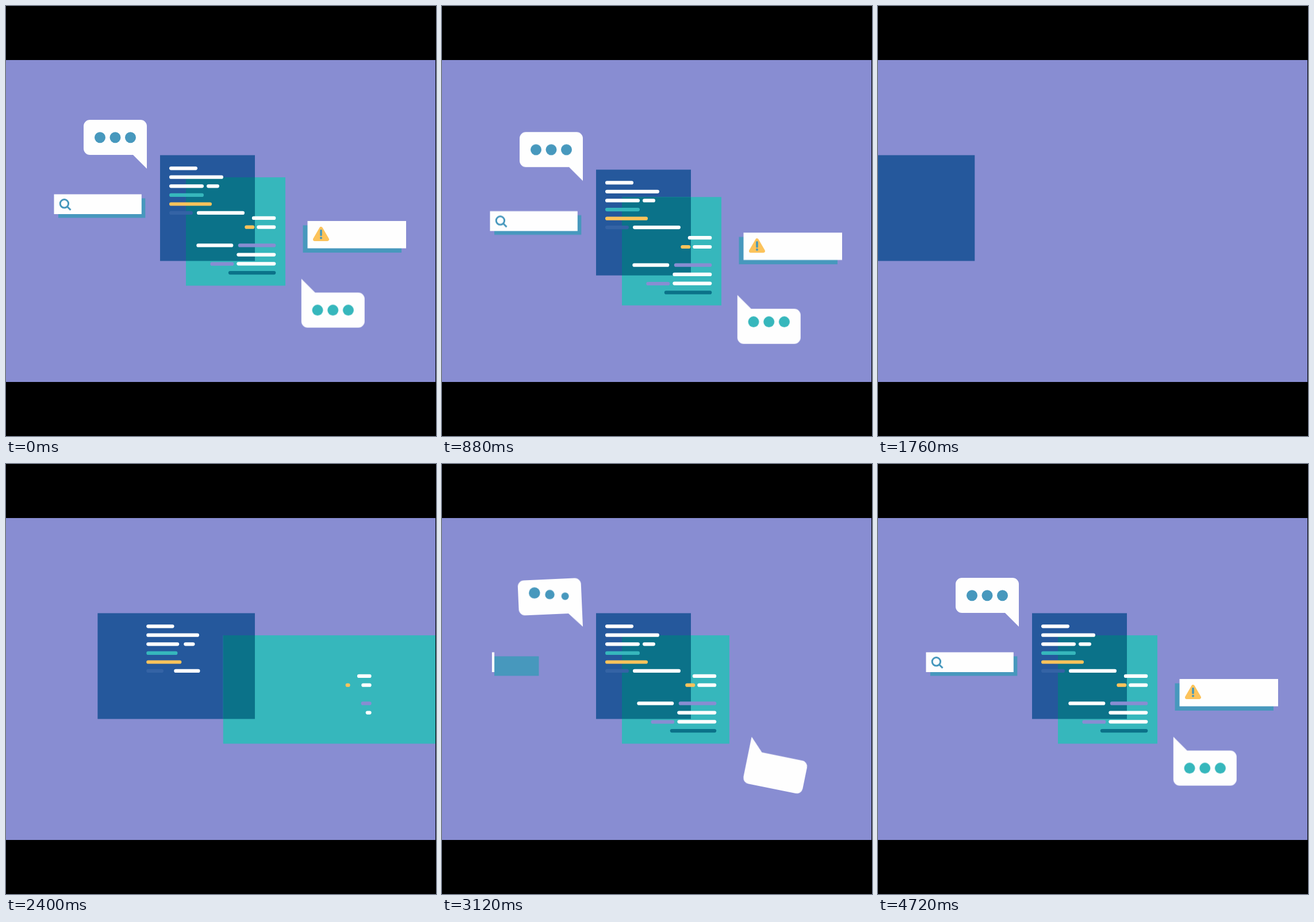
An HTML page without scripts that plays this animation: 748 by 748 pixels, repeating every 4800 ms.

```html
<!DOCTYPE html>
<html lang="en">
<head>
<meta charset="utf-8">
<title>Code sheets</title>
<style>
/* Clock in ms: starts on the empty stage (1600) and ends after everything has dropped out (6400). */
@property --t { syntax: "<number>"; inherits: true; initial-value: 4800; }
@keyframes clock { from { --t: 1600; } to { --t: 6400; } }

html, body { margin: 0; width: 100%; height: 100%; overflow: hidden; background: #000; }
svg { display: block; }

.stage {
  width: 100vw; height: 100vh;
  animation: clock 4.8s linear -3.2s infinite;
  --white: #fefefe; --lilac: #888dd2; --navy: #25589c; --teal: #36b7bc;
  --deep: #0b7289; --blue: #4798bd; --amber: #fcc35b; --dim: #3463a5;
}

/* --q runs from 1 to 0 over --d ms from --s; --e is its cubic ease-out. */
.stage * {
  --q: calc(1 - clamp(0, (var(--t) - var(--s, 0)) / var(--d, 800), 1));
  --r: calc(var(--q) * var(--q) * var(--q));
  --e: calc(1 - var(--r));
}

/* Sheet edges: the leading edge arrives first, the trailing edge catches up. */
.sheets {
  --a: clamp(0, (2440 - var(--t)) / 800, 1);
  --b: clamp(0, (2825 - var(--t)) / 800, 1);
  --c: clamp(0, (3076 - var(--t)) / 1100, 1);
  --k: clamp(0, (3461 - var(--t)) / 1100, 1);
  --navy-right: calc(433 - 433 * var(--a) * var(--a) * var(--a));
  --teal-left: calc(313 + 435 * var(--b) * var(--b) * var(--b));
  --navy-left: calc(268 - 470 * var(--c) * var(--c) * var(--c));
  --teal-right: calc(486 + 470 * var(--k) * var(--k) * var(--k));
  --n: max(0, var(--t) - 5496);
  --m: max(0, var(--t) - 5465);
}
.navy {
  x: calc(var(--navy-left) * 1px); y: 259.5px; height: 184px; fill: var(--navy);
  width: calc((var(--navy-right) - var(--navy-left)) * 1px);
}
.teal {
  x: calc(var(--teal-left) * 1px); y: 298px; height: 188.5px; fill: var(--teal);
  width: calc((var(--teal-right) - var(--teal-left)) * 1px);
}
.overlap {
  x: calc(var(--teal-left) * 1px); y: 298px; fill: var(--deep);
  width: max(0px, (var(--navy-right) - var(--teal-left)) * 1px);
  height: max(0px, (145.5 + .000735 * (var(--n) * var(--n) - var(--m) * var(--m))) * 1px);
}

.fall {
  --h: max(0, var(--t) - var(--o));
  transform: translateY(calc(var(--h) * var(--h) * .000735px));
}
.slide { transform: translateX(calc(var(--r) * var(--from) * 1px)); }
.line, .bar { width: calc(var(--w) * var(--e) * 1px); }
.line { --d: 800; height: 6.2px; rx: 3.1px; fill: var(--white); }
.bar { fill: var(--white); }
.shade { fill: var(--blue); }

.sway, .dot, .pop {
  opacity: clamp(0, var(--t) - var(--s), 1);
  animation: 4.8s ease-in-out calc((var(--s) - 4800) * 1ms) infinite;
}
.sway { animation-name: sway; }
.dot { animation-name: dot; }
.pop { animation-name: pop; }
.dot, .pop { transform-box: fill-box; transform-origin: center; }

@keyframes sway {
  0% { transform: translateX(-60px) rotate(0deg) scale(0); animation-timing-function: ease-out; }
  3.333% { transform: translateX(-25px) rotate(11.5deg) scale(.955); animation-timing-function: ease-out; }
  6.667% { transform: translateX(-8px) rotate(16deg) scale(1); }
  13.333% { transform: translateX(0) rotate(-2.5deg) scale(1); }
  15.4%, 100% { transform: translateX(0) rotate(0deg) scale(1); }
}
@keyframes dot {
  0% { transform: translateY(0) scale(0); animation-timing-function: linear; }
  1.25% { transform: translateY(0) scale(.68); animation-timing-function: linear; }
  2.9% { transform: translateY(-8px) scale(1.03); animation-timing-function: ease-out; }
  4.2% { transform: translateY(-9.5px) scale(1); }
  8.75% { transform: translateY(0) scale(1); }
  11.7% { transform: translateY(2.5px) scale(1); }
  14.6%, 100% { transform: translateY(0) scale(1); }
}
@keyframes pop {
  0% { transform: rotate(-40deg) scale(0); animation-timing-function: ease-out; }
  4% { transform: rotate(0deg) scale(1.08); }
  5.8% { transform: rotate(10deg) scale(.96); }
  9%, 100% { transform: rotate(0deg) scale(1); }
}
</style>
</head>
<body>
<svg class="stage" viewBox="0 0 748 748">
  <defs>
    <path id="bubble" fill="#fefefe" d="M0 0V-74a11 11 0 0 0-11-11H-99a11 11 0 0 0-11 11V-35a11 11 0 0 0 11 11H-24Z"/>
  </defs>
  <svg y="94" width="747" height="560" viewBox="0 94 747 560">
    <rect y="94" width="747" height="560" fill="#888dd2"/>

    <g class="sheets">
      <g class="fall" style="--o:5496"><rect class="navy"/></g>
      <g class="fall" style="--o:5465"><rect class="teal"/><rect class="overlap"/></g>
    </g>

    <g class="fall" style="--o:5496">
      <g class="slide" style="--s:1790;--d:1340;--from:-247">
        <g transform="translate(284 279.2)">
          <rect class="line" style="--s:1790;--w:49"/>
          <rect class="line" y="15.4" style="--s:1830;--w:94"/>
          <rect class="line" y="31" style="--s:1896;--w:60"/>
          <rect class="line" x="65" y="31" style="--s:2000;--w:22"/>
          <rect class="line" y="46.6" style="--s:1968;--w:60;fill:var(--teal)"/>
          <rect class="line" y="62.2" style="--s:2048;--w:74;fill:var(--amber)"/>
          <rect class="line" y="77.6" style="--s:2120;--w:41;fill:var(--dim)"/>
          <rect class="line" x="48" y="77.6" style="--s:2216;--w:83"/>
        </g>
      </g>
    </g>

    <g class="fall" style="--o:5465">
      <g class="slide" style="--s:2190;--d:1341;--from:278">
        <g transform="translate(469.3 365.8) scale(-1 1)">
          <rect class="line" style="--s:2192;--w:41.5"/>
          <rect class="line" y="15.8" style="--s:2224;--w:33"/>
          <rect class="line" x="37" y="15.8" style="--s:2248;--w:17;fill:var(--amber)"/>
          <rect class="line" y="47.5" style="--s:2320;--w:65.5;fill:var(--lilac)"/>
          <rect class="line" x="74" y="47.5" style="--s:2410;--w:64"/>
          <rect class="line" y="63.7" style="--s:2360;--w:68"/>
          <rect class="line" y="79.4" style="--s:2430;--w:68"/>
          <rect class="line" x="73" y="79.8" style="--s:2480;--w:41;fill:var(--lilac)"/>
          <rect class="line" y="95.2" style="--s:2552;--w:82.5;fill:var(--deep)"/>
        </g>
      </g>
    </g>

    <g class="fall" style="--o:5511">
      <g transform="translate(245 283)">
        <g class="sway" style="--s:2480">
          <use href="#bubble"/>
          <g fill="#4798bd">
            <circle class="dot" cx="-81.5" cy="-54.2" r="9.5" style="--s:2980"/>
            <circle class="dot" cx="-55" cy="-54.2" r="9.5" style="--s:3020"/>
            <circle class="dot" cx="-28.5" cy="-54.2" r="9.5" style="--s:3060"/>
          </g>
        </g>
      </g>
    </g>

    <g class="fall" style="--o:5485">
      <g transform="translate(513.8 474.5) rotate(180)">
        <g class="sway" style="--s:2960"><use href="#bubble"/></g>
      </g>
    </g>
    <g class="fall" style="--o:5515">
      <g transform="translate(513.8 474.5)">
        <g class="sway" style="--s:2960" fill="#36b7bc">
          <circle class="dot" cx="28.2" cy="54.6" r="9.5" style="--s:3460"/>
          <circle class="dot" cx="54.9" cy="54.6" r="9.5" style="--s:3500"/>
          <circle class="dot" cx="81.6" cy="54.6" r="9.5" style="--s:3540"/>
        </g>
      </g>
    </g>

    <g class="fall" style="--o:5481">
      <rect class="bar shade" x="91" y="334.5" height="34" style="--s:2877;--d:1147;--w:151.3"/>
      <rect class="bar slide" x="83.5" y="327.5" height="34.5" style="--s:3111;--d:1080;--w:152.3;--from:3.5"/>
      <g class="pop" style="--s:3400" fill="none" stroke="#4798bd" stroke-width="3">
        <circle cx="101.4" cy="343.8" r="7.2"/>
        <path d="M106.5 349L112.5 354.8"/>
      </g>
    </g>

    <g class="fall" style="--o:5515">
      <g transform="translate(688 0) scale(-1 1)">
        <rect class="bar shade" y="381.5" height="47.5" style="--s:3324;--d:1147;--w:171.5"/>
        <rect class="bar slide" x="-8" y="374" height="47.5" style="--s:3596;--d:1080;--w:171.5;--from:3.5"/>
      </g>
      <g class="pop" style="--s:4080">
        <path d="M548 387L559 406H537Z" fill="#fcc35b" stroke="#fcc35b" stroke-width="6" stroke-linejoin="round"/>
        <path d="M548 390.5V398.5" stroke="#4798bd" stroke-width="3.6" stroke-linecap="round"/>
        <circle cx="548" cy="403.6" r="2" fill="#4798bd"/>
      </g>
    </g>
  </svg>
</svg>
</body>
</html>
```
